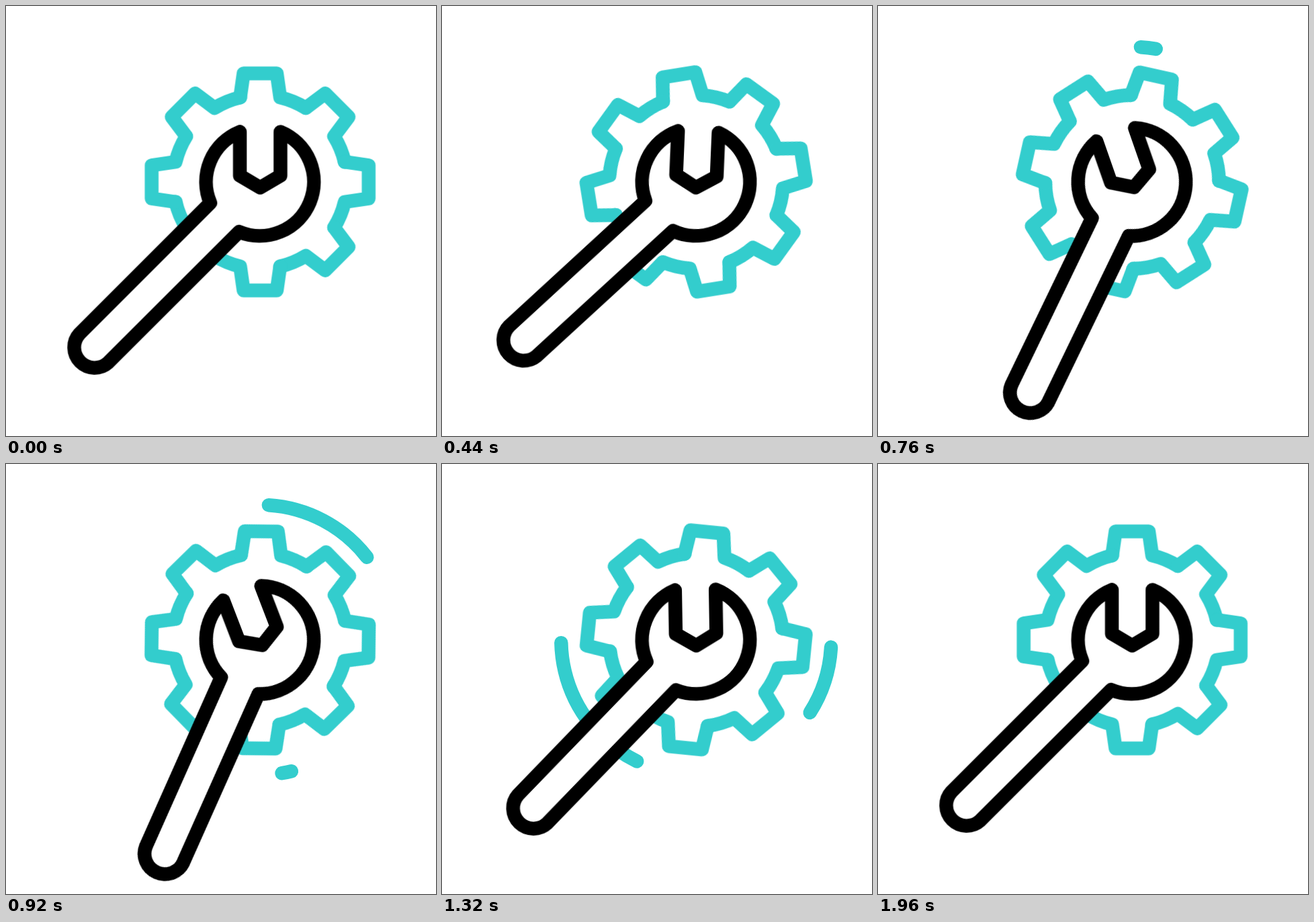
Recreate the animation shown at these times as an HTML page. Size 640 by 640 pixels, loop 3 s.

```html
<!DOCTYPE html>
<html lang="en">
<head>
<meta charset="utf-8">
<title>Wrench and gear</title>
<style>
  @property --head { syntax: "<length>"; inherits: false; initial-value: 0px; }
  @property --tail { syntax: "<length>"; inherits: false; initial-value: 0px; }

  html, body { margin: 0; width: 100%; height: 100%; overflow: hidden; background: #fff; }
  svg { display: block; width: 100%; height: 100%; }

  g, path, circle { stroke-width: 20.5; stroke-linecap: round; stroke-linejoin: round; }
  .teal { fill: none; stroke: #33cdcd; }
  .black { fill: #fff; stroke: #000; }

  :root { --smooth: cubic-bezier(.333, 0, .667, 1); }

  #gear { animation: spin 3s var(--smooth) both paused; }
  #wrench { animation: swing 3s var(--smooth) both paused; }

  /* One unit of dash length is one degree of the circle. */
  .trail {
    visibility: hidden;
    stroke-dasharray: calc(var(--head) - var(--tail)) 999px;
    stroke-dashoffset: calc(var(--tail) * -1);
    animation-name: head, tail, show;
    animation-timing-function: var(--smooth);
    animation-fill-mode: both, both, none;
    animation-play-state: paused;
  }
  #right {
    --span: 119px;
    animation-duration: 540ms, 588ms, 828ms;
    animation-delay: 683ms, 923ms, 683ms;
  }
  #left {
    --span: 108px;
    animation-duration: 540ms, 538ms, 782ms;
    animation-delay: 856ms, 1100ms, 856ms;
  }

  @keyframes spin {
    0% { transform: rotate(0deg); }
    16% { transform: rotate(-9.3deg); animation-timing-function: cubic-bezier(.46, 0, .675, 1); }
    65.333%, 100% { transform: rotate(360deg); }
  }
  @keyframes swing {
    0% { transform: rotate(0deg); }
    13.333% { transform: rotate(3deg); }
    27.733%, 30.667% { transform: rotate(-21deg); }
    46%, 100% { transform: rotate(0deg); }
  }
  @keyframes head { from { --head: 0px; } to { --head: var(--span); } }
  @keyframes tail { from { --tail: 0px; } to { --tail: var(--span); } }
  @keyframes show { from, to { visibility: visible; } }
</style>
</head>
<body>
<svg viewBox="0 0 640 640">
  <g transform="translate(378.3 261.8)">
    <g class="teal">
      <g transform="rotate(-86.4)"><circle id="right" class="trail" r="201" pathLength="360"/></g>
      <g transform="rotate(76.6)"><circle id="left" class="trail" r="201" pathLength="360"/></g>
      <g id="gear">
        <path id="tooth" d="M-29.8-125.8L-24.7-161.5H24.7L29.8-125.8A129.3 129.3 0 0 1 67.9-110"/>
      </g>
    </g>
    <path id="wrench" class="black" d="M-30.2-74.6V-9.3L0 8.5L30.2-9.3V-74.6
      A80.5 80.5 0 0 1-31.3 74.2L-226.1 268.8A30.3 30.3 0 0 1-268.9 226
      L-74.2 31.3A80.5 80.5 0 0 1-30.2-74.6Z"/>
  </g>
</svg>
<script>
  const LOOP = 3000, STEP = 40;
  const gear = document.getElementById('gear');
  const tooth = document.getElementById('tooth');

  for (let i = 1; i < 8; i++) {
    const copy = tooth.cloneNode();
    copy.removeAttribute('id');
    copy.setAttribute('transform', `rotate(${i * 45})`);
    gear.append(copy);
  }

  // The keyframes stay paused; this clock moves them in 40 ms steps.
  const animations = document.getAnimations();
  let start;

  function tick(now) {
    start ??= now;
    const time = Math.floor(((now - start + 0.5) % LOOP) / STEP) * STEP;
    for (const animation of animations) animation.currentTime = time;
    requestAnimationFrame(tick);
  }
  requestAnimationFrame(tick);
</script>
</body>
</html>
```
